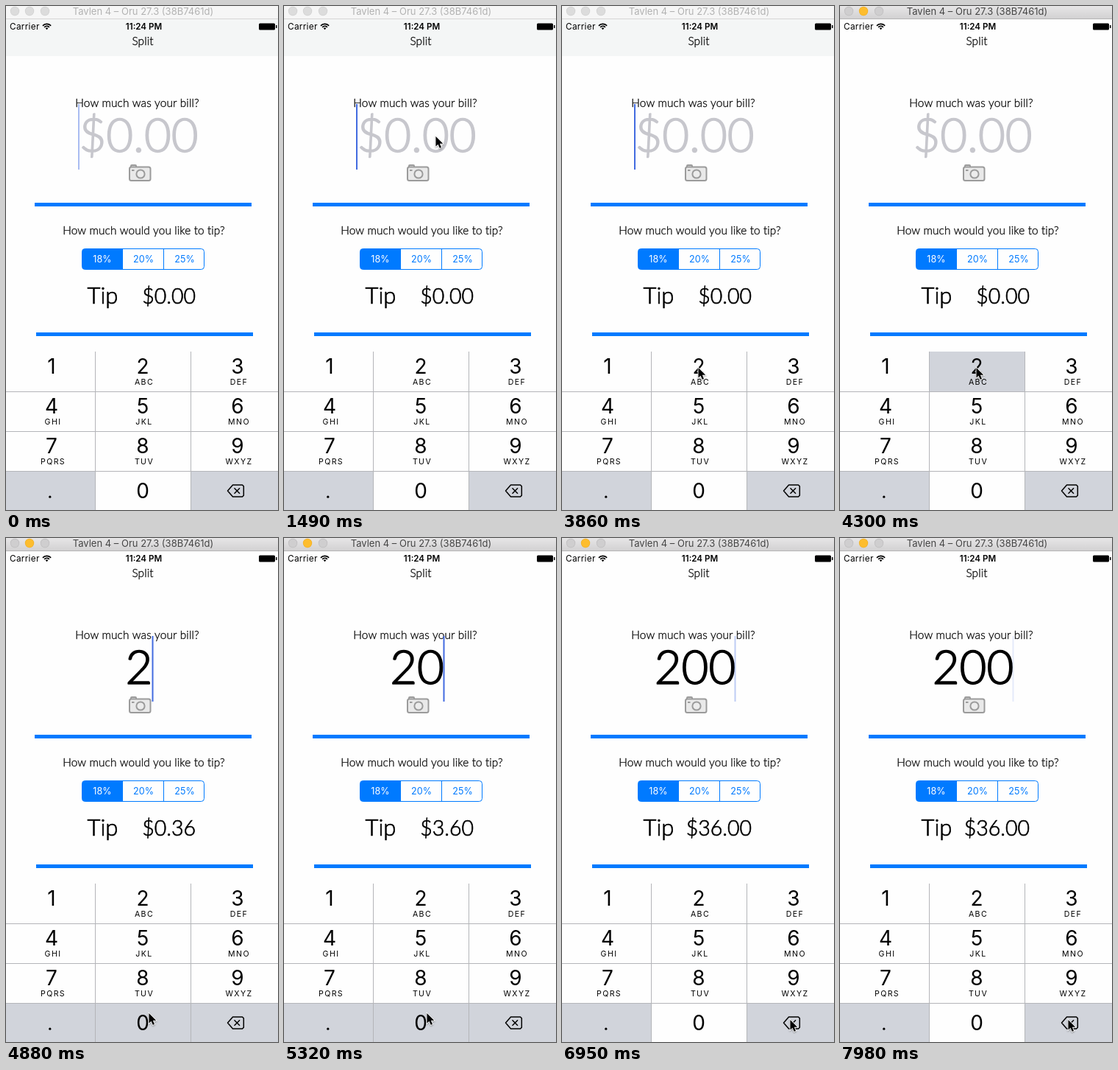
An HTML page with a canvas that plays this animation: 370 px wide and 684 px high, repeating every 8000 ms.

```html
<!DOCTYPE html>
<html lang="en">
<head>
<meta charset="utf-8">
<title>Tip calculator</title>
<style>
html, body { margin: 0; width: 370px; height: 684px; overflow: hidden; background: #fefefe; }
canvas { display: block; width: 370px; height: 684px; }
</style>
</head>
<body>
<canvas id="stage" width="370" height="684"></canvas>
<script>
const ctx = document.getElementById('stage').getContext('2d');
const LOOP = 8000, STEP = 147.7, BLUE = '#007aff', KEY_GRAY = '#d1d4db';
const LATO = 'Lato, sans-serif', INTER = 'Inter, sans-serif';
const BODY = '300 15.4px ' + LATO, BODY_STYLE = { spacing: 0.1, bold: 0.3 };

// Each entry begins at a step; blink is when the caret's cycle starts, in ms.
const entries = [
  { step: 0, bill: '', tip: '$0.00', blink: 1477 },
  { step: 30, bill: '2', tip: '$0.36', blink: 4500 },
  { step: 34, bill: '20', tip: '$3.60', blink: 4972 },
  { step: 37, bill: '200', tip: '$36.00', blink: 5425 }
];
const pointerPath = [
  [148, 222, 262], [443, 211, 202], [600, 207, 184], [1180, 206, 177],
  [2250, 206, 177], [2800, 71, 500], [2960, 76, 612], [3110, 90, 613],
  [3600, 180, 500], [3830, 185, 491], [4300, 185, 491], [4590, 193, 630],
  [4720, 194, 645], [5910, 194, 645], [6640, 310, 654]
];
const ACTIVE_STEP = 27;
const keyLetters = ['', 'ABC', 'DEF', 'GHI', 'JKL', 'MNO', 'PQRS', 'TUV', 'WXYZ'];
const columns = [62, 186, 315];

function rect(x, y, w, h, color) {
  ctx.fillStyle = color;
  ctx.fillRect(x, y, w, h);
}

function disc(x, y, r, color) {
  ctx.fillStyle = color;
  ctx.beginPath();
  ctx.arc(x, y, r, 0, 7);
  ctx.fill();
}

function text(str, x, y, font, { color = '#000', align = 'center', spacing = 0, bold = 0 } = {}) {
  ctx.font = font;
  ctx.textAlign = align;
  ctx.letterSpacing = spacing + 'px';
  ctx.fillStyle = color;
  ctx.fillText(str, x, y);
  if (bold) {
    ctx.strokeStyle = color;
    ctx.lineWidth = bold;
    ctx.lineJoin = 'round';
    ctx.strokeText(str, x, y);
  }
}

function shape(points) {
  ctx.beginPath();
  points.forEach(([x, y]) => ctx.lineTo(x, y));
  ctx.closePath();
}

function drawTitleBar(active) {
  const bar = ctx.createLinearGradient(0, 0, 0, 17);
  bar.addColorStop(0, active ? '#e7e6e7' : '#f6f6f6');
  bar.addColorStop(1, active ? '#d2d1d2' : '#f6f6f6');
  rect(0, 0, 370, 17, bar);
  rect(0, 17, 370, 1, active ? '#b5b4b5' : '#d6d6d6');
  [12, 32, 53].forEach((x, i) => {
    const lit = active && i === 1;
    disc(x, 7, 6.2, lit ? '#f0b02a' : active ? '#bdbcbd' : '#d0d0d0');
    disc(x, 7, 5.5, lit ? '#fdbd2e' : active ? '#cfcecf' : '#dcdcdc');
  });
  text('Tavlen 4 – Oru 27.3 (38B7461d)', 186.5, 12, '13px ' + INTER,
    { color: active ? '#454545' : '#b2b2b2' });
}

function drawStatusBar() {
  text('Carrier', 5, 32, '11.8px ' + INTER, { align: 'left', spacing: 0.3 });
  ctx.strokeStyle = '#000';
  ctx.lineWidth = 1.7;
  [4.6, 7.6].forEach(r => {
    ctx.beginPath();
    ctx.arc(55.5, 32, r, -Math.PI * 0.76, -Math.PI * 0.24);
    ctx.stroke();
  });
  shape([[53.6, 30], [55.5, 29.2], [57.4, 30], [55.5, 32.2]]);
  ctx.fillStyle = '#000';
  ctx.fill();
  text('11:24 PM', 187.5, 32, '600 11.6px ' + INTER);
  ctx.beginPath();
  ctx.roundRect(344, 23.5, 22, 9, 1.5);
  ctx.fill();
  rect(367, 26, 1.5, 4, '#000');
  text('Split', 186, 53, BODY, BODY_STYLE);
}

function drawCamera() {
  ctx.strokeStyle = '#9b9b9b';
  ctx.fillStyle = '#e9e9e9';
  ctx.lineWidth = 2;
  ctx.beginPath();
  ctx.roundRect(170, 216, 7, 4, 1);
  ctx.fill();
  ctx.stroke();
  ctx.beginPath();
  ctx.roundRect(168, 218.5, 28.5, 18.5, 2.5);
  ctx.fill();
  ctx.stroke();
  disc(183, 228, 6, '#ececec');
  ctx.beginPath();
  ctx.arc(183, 228, 5.6, 0, 7);
  ctx.stroke();
  rect(171, 222, 3.5, 2, '#9b9b9b');
}

function drawSegments() {
  ctx.save();
  ctx.beginPath();
  ctx.roundRect(103.5, 329.5, 166, 28, 4);
  ctx.clip();
  rect(103, 329, 56, 29, BLUE);
  ctx.restore();
  ctx.strokeStyle = BLUE;
  ctx.lineWidth = 1;
  ctx.beginPath();
  ctx.roundRect(103.5, 329.5, 166, 28, 4);
  ctx.stroke();
  rect(158, 329, 1, 29, BLUE);
  rect(214, 329, 1, 29, BLUE);
  ['18%', '20%', '25%'].forEach((label, i) =>
    text(label, 131 + 56 * i, 348, '12.6px ' + INTER, { color: i ? BLUE : '#fff' }));
}

function drawBill(entry, t) {
  text('How much was your bill?', 178.5, 136.5, BODY, BODY_STYLE);
  text(entry.bill || '$0.00', entry.bill ? 181 : 180.5, 198, '300 63.5px ' + LATO,
    { color: entry.bill ? '#000' : '#c7c7cd', bold: 1.6 });
  drawCamera();
  const x = entry.bill ? 180.5 + 18 * entry.bill.length : 98;
  ctx.globalAlpha = caretAlpha(t - entry.blink);
  rect(x, 133, 2, 89, '#426be0');
  ctx.globalAlpha = 1;
}

function drawTip(entry) {
  rect(39, 267, 295, 5, BLUE);
  text('How much would you like to tip?', 187.5, 309.5, BODY, BODY_STYLE);
  drawSegments();
  text('Tip', 110.5, 403.5, '300 31px ' + LATO, { align: 'left', bold: 0.7 });
  text(entry.tip, 258, 403.5, '300 28.5px ' + LATO, { align: 'right', bold: 0.7 });
  rect(41, 443, 295, 5, BLUE);
}

function drawDeleteIcon() {
  ctx.strokeStyle = '#000';
  ctx.lineWidth = 1.5;
  ctx.lineJoin = 'round';
  shape([[301.5, 658], [308.5, 650], [321.5, 650], [323.3, 651.8],
    [323.3, 664.2], [321.5, 666], [308.5, 666]]);
  ctx.stroke();
  ctx.beginPath();
  ctx.moveTo(310.5, 654.3);
  ctx.lineTo(318, 661.7);
  ctx.moveTo(318, 654.3);
  ctx.lineTo(310.5, 661.7);
  ctx.stroke();
}

function drawKeypad(pressed) {
  rect(0, 469, 370, 215, '#fefefe');
  rect(0, 632, 121, 52, KEY_GRAY);
  rect(252, 632, 118, 52, KEY_GRAY);
  if (pressed === '2') rect(122, 469, 129, 54, KEY_GRAY);
  if (pressed === '0') rect(122, 632, 129, 52, KEY_GRAY);
  [523, 577, 631].forEach(y => rect(0, y, 370, 1, '#b4b5b9'));
  [121, 251].forEach(x => rect(x, 469, 1, 215, '#b4b5b9'));
  keyLetters.forEach((letters, i) => {
    const x = columns[i % 3], y = 499 + 54 * Math.floor(i / 3);
    text(String(i + 1), x, y, '28px ' + INTER);
    text(letters, x + 2, y + 15, '10.6px ' + INTER, { spacing: 1.4 });
  });
  text('0', 186, 668, '28px ' + INTER);
  disc(59.8, 666.2, 1.6, '#000');
  drawDeleteIcon();
}

function caretAlpha(ms) {
  const phase = ((ms % 990) + 990) % 990;
  if (phase < 385) return 1;
  if (phase < 600) return 1 - (phase - 385) / 215;
  return Math.max(0, (phase - 830) / 160);
}

function pointerAt(t) {
  const next = pointerPath.findIndex(p => p[0] > t);
  if (next < 0) return pointerPath[pointerPath.length - 1].slice(1);
  if (next === 0) return null;
  const [t0, x0, y0] = pointerPath[next - 1], [t1, x1, y1] = pointerPath[next];
  const k = (t - t0) / (t1 - t0), ease = k * k * (3 - 2 * k);
  return [x0 + (x1 - x0) * ease, y0 + (y1 - y0) * ease];
}

function drawPointer(position) {
  if (!position) return;
  ctx.save();
  ctx.translate(...position);
  ctx.scale(0.93, 0.93);
  shape([[0.5, 0], [0.5, 14.5], [3.8, 11.5], [6.2, 17], [8.6, 16], [6.3, 10.6], [11, 10.4]]);
  ctx.lineJoin = 'miter';
  ctx.shadowColor = 'rgba(0,0,0,.35)';
  ctx.shadowBlur = 2;
  ctx.shadowOffsetY = 1;
  ctx.strokeStyle = '#fff';
  ctx.lineWidth = 1.8;
  ctx.stroke();
  ctx.shadowColor = 'transparent';
  ctx.fillStyle = '#000';
  ctx.fill();
  ctx.restore();
}

function pressedKey(step) {
  if (step === 28 || step === 29) return '2';
  return step === 33 || step === 36 ? '0' : '';
}

function draw(now) {
  const step = Math.floor((now % LOOP) / STEP), t = step * STEP;
  const active = step >= ACTIVE_STEP;
  const entry = entries.filter(e => e.step <= step).pop();
  rect(0, 0, 370, 684, '#fefefe');
  if (!active) rect(0, 18, 370, 50, '#f4f6f6');
  drawTitleBar(active);
  drawStatusBar();
  drawBill(entry, t);
  drawTip(entry);
  drawKeypad(pressedKey(step));
  drawPointer(pointerAt(t));
}

const start = performance.now();
function tick() {
  draw(performance.now() - start);
  requestAnimationFrame(tick);
}
tick();
</script>
</body>
</html>
```
